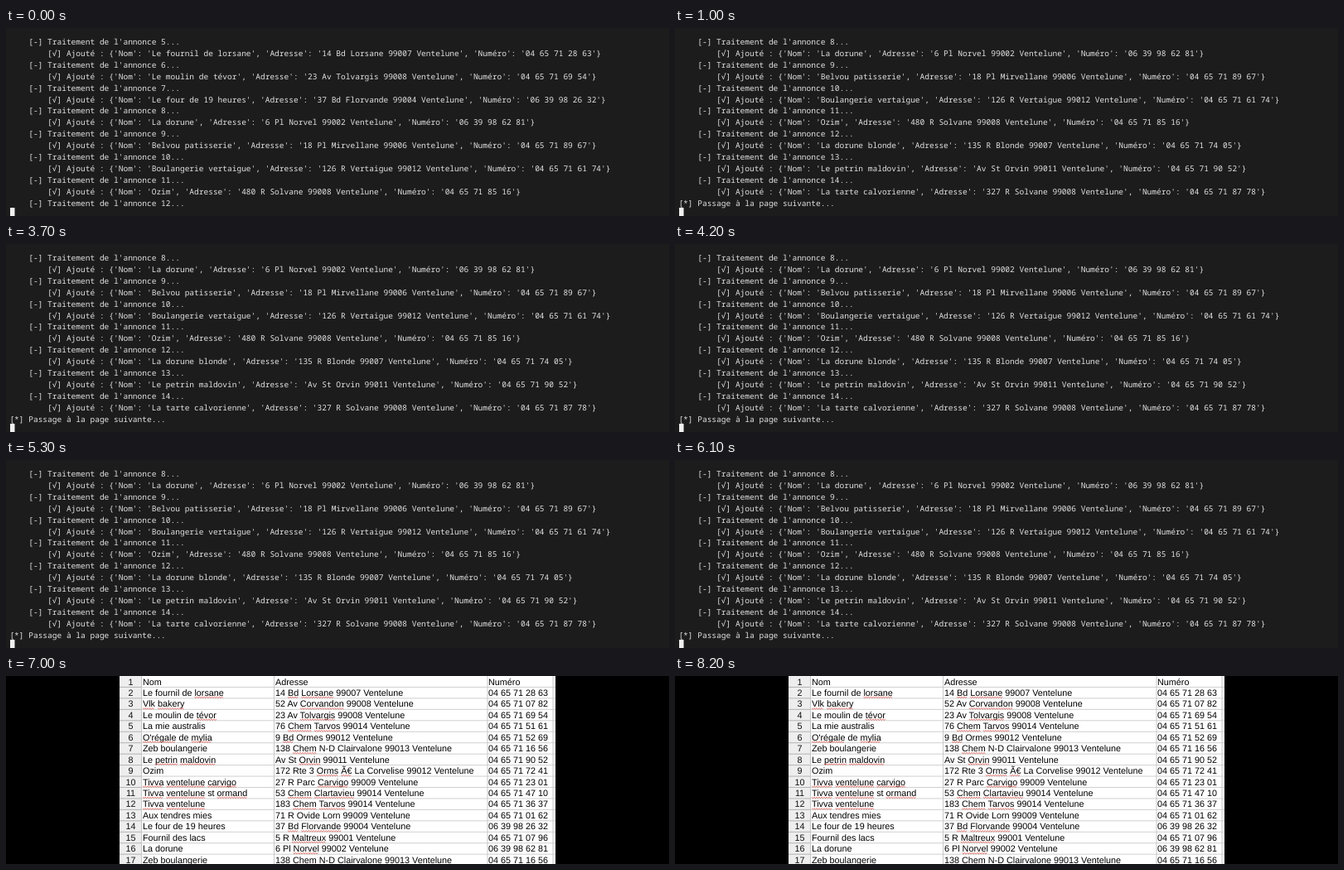
An HTML page with a canvas that plays this animation: 800x227 px, repeating every 9.1 s.

```html
<!DOCTYPE html>
<html lang="fr">
<head>
<meta charset="utf-8">
<style>
html, body { margin: 0; height: 100%; overflow: hidden; background: #000; }
canvas { display: block; }
</style>
</head>
<body>
<canvas id="stage" width="800" height="227"></canvas>
<script>
const ctx = document.getElementById('stage').getContext('2d');
const LOOP = 9100, SHEET_START = 6900;

const entry = text => {
  const [name, address, phone] = text.split('|');
  return [name, address + ' Ventelune', phone];
};

const ads = [
  'Le fournil de lorsane|14 Bd Lorsane 99007|04 65 71 28 63',
  'Le moulin de tévor|23 Av Tolvargis 99008|04 65 71 69 54',
  'Le four de 19 heures|37 Bd Florvande 99004|06 39 98 26 32',
  'La dorune|6 Pl Norvel 99002|06 39 98 62 81',
  'Belvou patisserie|18 Pl Mirvellane 99006|04 65 71 89 67',
  'Boulangerie vertaigue|126 R Vertaigue 99012|04 65 71 61 74',
  'Ozim|480 R Solvane 99008|04 65 71 85 16',
  'La dorune blonde|135 R Blonde 99007|04 65 71 74 05',
  'Le petrin maldovin|Av St Orvin 99011|04 65 71 90 52',
  'La tarte calvorienne|327 R Solvane 99008|04 65 71 87 78',
].map(entry);

const log = ads.flatMap(([name, address, phone], i) => [
  `    [-] Traitement de l'annonce ${i + 5}...`,
  `        [√] Ajouté : {'Nom': '${name}', 'Adresse': '${address}', 'Numéro': '${phone}'}`,
]).concat(
  '[*] Passage à la page suivante...',
  '',
  '[√] Scraping terminé. Résultats enregistrés dans contacts.csv.',
);

// [start time, number of printed lines]
const prints = [[0, 15], [300, 17], [600, 19], [900, 21], [6500, 23]];

const zeb = entry('Zeb boulangerie|138 Chem N-D Clairvalone 99013|04 65 71 16 56');
const table = [
  ['Nom', 'Adresse', 'Numéro'],
  ads[0],
  entry('Vlk bakery|52 Av Corvandon 99008|04 65 71 07 82'),
  ads[1],
  entry('La mie australis|76 Chem Tarvos 99014|04 65 71 51 61'),
  entry("O'régale de mylia|9 Bd Ormes 99012|04 65 71 52 69"),
  zeb,
  ads[8],
  entry('Ozim|172 Rte 3 Orms Ã€ La Corvelise 99012|04 65 71 72 41'),
  entry('Tivva ventelune carvigo|27 R Parc Carvigo 99009|04 65 71 23 01'),
  entry('Tivva ventelune st ormand|53 Chem Clartavieu 99014|04 65 71 47 10'),
  entry('Tivva ventelune|183 Chem Tarvos 99014|04 65 71 36 37'),
  entry('Aux tendres mies|71 R Ovide Lorn 99009|04 65 71 01 62'),
  ads[2],
  entry('Fournil des lacs|5 R Maltreux 99001|04 65 71 07 96'),
  ads[3],
  zeb,
];
const misspelt = /lorsane|Lorsane|tévor|Tolvargis|Bd|Florvande|Norvel|Vlk|bakery|Corvandon|Chem|Tarvos|O'régale|mylia|petrin|maldovin|Orvin|Orms|Ã€|Tivva|ventelune|carvigo|Carvigo|ormand|Clartavieu|Maltreux/g;

function rect(color, x, y, w, h) {
  ctx.fillStyle = color;
  ctx.fillRect(x, y, w, h);
}

function setType(font, color, align = 'left') {
  ctx.font = font;
  ctx.fillStyle = color;
  ctx.textAlign = align;
  ctx.textRendering = 'geometricPrecision';
}

function drawTerminal(t) {
  const count = prints.findLast(([start]) => t >= start)[1];
  const done = count === log.length;
  const prompt = done ? 'PS C:\\Users\\tivel> ' : '';
  rect('#1c1c1c', 0, 0, 800, 227);
  setType('500 9.523px "Noto Sans Mono", "DejaVu Sans Mono", monospace', '#e2e2e2');
  [...log.slice(count - 15, count), prompt].forEach((line, row) =>
    ctx.fillText(line, 4.4, 19.9 + 13.93 * row));
  rect('#f0f0f0', done ? 113 : 5, 217, 5.5, 10);
}

function drawWave(x, y, width) {
  ctx.beginPath();
  for (let d = 0; d <= width; d += 1.5) ctx.lineTo(x + d, y + (d / 1.5 % 2 ? 1.4 : 0));
  ctx.stroke();
}

function drawCell(text, x, y) {
  ctx.fillText(text, x, y);
  for (const { 0: word, index } of text.matchAll(misspelt)) {
    const start = ctx.measureText(text.slice(0, index)).width;
    drawWave(x + start, y + 1.2, ctx.measureText(word).width);
  }
}

function drawSheet() {
  const rowHeight = 13.45, font = '10.8px "Liberation Sans", Arial, sans-serif';
  rect('#000', 0, 0, 800, 227);
  rect('#fff', 137, 0, 526, 227);
  rect('#eee', 137, 0, 27, 227);
  for (let row = 1; row <= table.length; row++) {
    rect('#d0d0d0', 164, row * rowHeight - 0.5, 499, 1);
    rect('#b4b4b4', 137, row * rowHeight - 0.5, 27, 1);
  }
  for (const x of [163, 323, 580.5, 659.5]) rect('#c8c8c8', x, 0, 1, 227);
  ctx.strokeStyle = '#e0483f';
  ctx.lineWidth = 0.8;
  table.forEach((cells, row) => {
    const y = 10.5 + row * rowHeight;
    setType(font, '#111', 'center');
    ctx.fillText(row + 1, 150.5, y);
    setType(font, '#000');
    cells.forEach((text, i) => drawCell(text, [165, 325, 582][i], y));
  });
}

function frame() {
  const t = performance.now() % LOOP;
  if (t < SHEET_START) drawTerminal(t);
  else drawSheet();
  requestAnimationFrame(frame);
}
frame();
</script>
</body>
</html>
```
